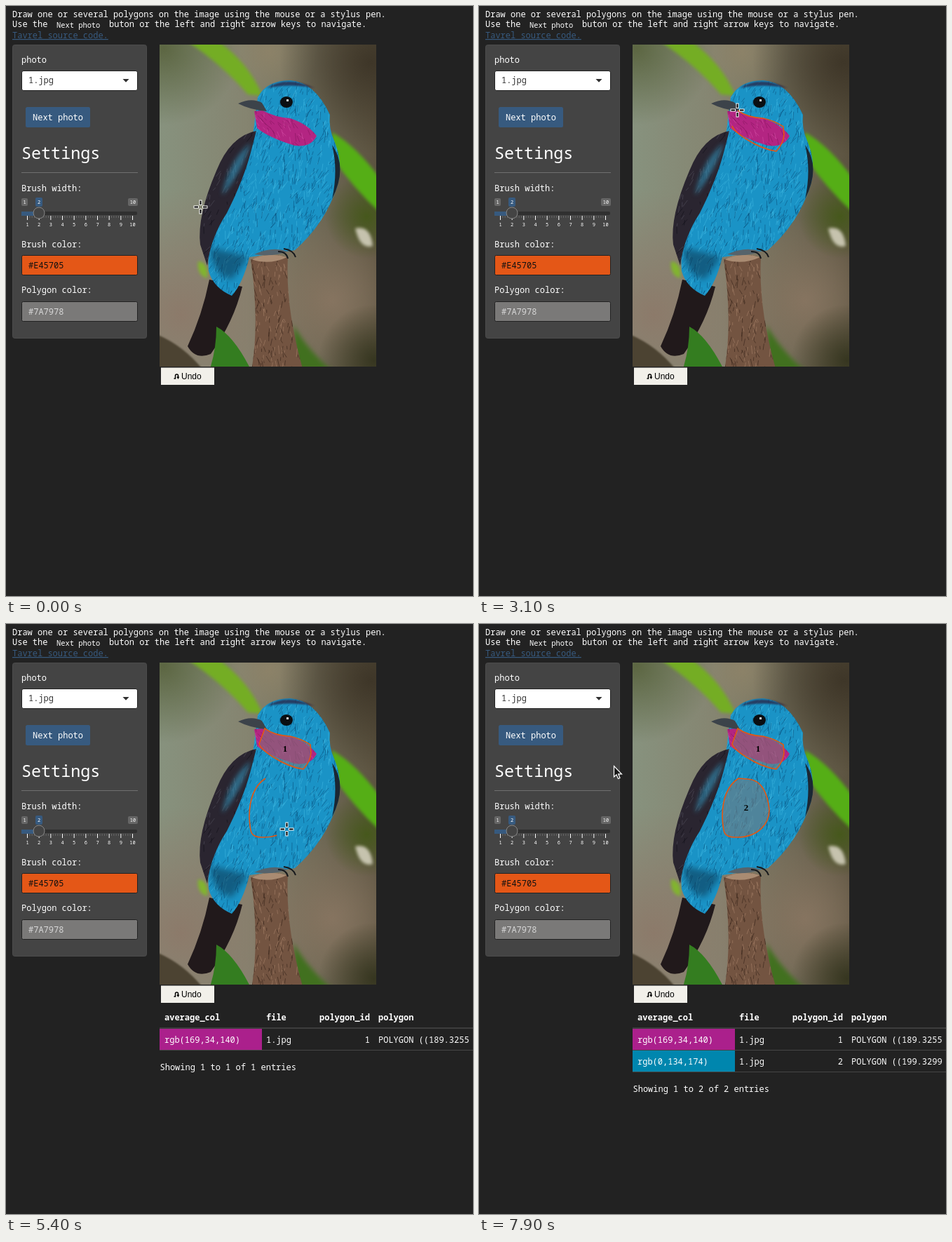
Recreate the animation shown at these times as an HTML page with a canvas. Size 666 by 841 pixels, loop 8 s.

```html
<!DOCTYPE html>
<html lang="en">
<head>
<meta charset="utf-8">
<title>Polygon drawing</title>
<style>
html, body { margin: 0; width: 100%; height: 100%; overflow: hidden; background: #222; }
svg, canvas { position: absolute; left: 0; top: 0; width: 666px; height: 841px; }
text { font: 12px "Noto Sans Mono", "DejaVu Sans Mono", monospace; fill: #fff; white-space: pre; }
.code { font-size: 10.4px; }
.link { fill: #375a7f; text-decoration: underline; }
.title { font-size: 23.4px; }
.tiny { font-size: 7px; text-anchor: middle; }
.head { font-weight: bold; }
.end { text-anchor: end; }
.undo { font: 12px "Liberation Sans", Arial, sans-serif; fill: #000; }
.rule { stroke: #464646; }
</style>
</head>
<body>
<svg viewBox="0 0 666 841">
  <text x="9" y="16">Draw one or several polygons on the image using the mouse or a stylus pen.</text>
  <text x="9" y="30">Use the</text>
  <text class="code" x="72" y="31">Next photo</text>
  <text x="147" y="30">buton or the left and right arrow keys to navigate.</text>
  <text class="link" x="9" y="46">Tavrel source code.</text>

  <rect x="9.5" y="55.5" width="191" height="418" rx="3" fill="#444" stroke="#4c4c4c"/>
  <text x="22" y="81">photo</text>
  <rect x="22.5" y="92.5" width="165" height="28" rx="2.5" fill="#fff" stroke="#222"/>
  <text x="32" y="110" style="fill:#333">1.jpg</text>
  <path d="M166.5 104h9l-4.5 4.8z" fill="#303030"/>
  <rect x="28" y="144" width="92" height="29" rx="2.5" fill="#375a7f"/>
  <text x="38" y="163">Next photo</text>
  <text class="title" x="22" y="218">Settings</text>
  <path d="M22 237.5H188" stroke="#707070"/>
  <text x="22" y="264">Brush width:</text>
  <g id="slider">
    <rect x="22" y="274" width="9" height="11" rx="2" fill="#666"/>
    <rect x="42" y="273" width="10" height="13" rx="2" fill="#375a7f"/>
    <rect x="174" y="274" width="14" height="11" rx="2" fill="#666"/>
    <text class="tiny" x="26.5" y="282">1</text>
    <text class="tiny" x="47" y="282">2</text>
    <text class="tiny" x="181" y="282">10</text>
    <rect x="22" y="293" width="165" height="5" rx="2" fill="#303030"/>
    <rect x="22" y="293" width="25" height="6" fill="#375a7f"/>
  </g>
  <text x="22" y="344">Brush color:</text>
  <rect x="22.5" y="355.5" width="165" height="28" rx="2" fill="#e45717" stroke="#222"/>
  <text x="32" y="374" style="fill:#111">#E45705</text>
  <text x="22" y="409">Polygon color:</text>
  <rect x="22.5" y="421.5" width="165" height="28" rx="2" fill="#7a7978" stroke="#222"/>
  <text x="32" y="440" style="fill:#d8d8d8">#7A7978</text>

  <rect x="221" y="515.5" width="76" height="24.5" fill="#f2f0ea"/>
  <path d="M239.5 531h2v-4q0-2 2-2t2 2v2M244 528.5l1.5 2 1-2" fill="none" stroke="#000" stroke-width="1.5"/>
  <text class="undo" x="250" y="532">Undo</text>

  <g id="table">
    <text class="head" x="226" y="565">average_col</text>
    <text class="head" x="371" y="565">file</text>
    <text class="head end" x="519" y="565">polygon_id</text>
    <text class="head" x="531" y="565">polygon</text>
    <path class="rule" d="M219 576H666" stroke-width="1.5"/>
    <rect x="219" y="577" width="146" height="30" fill="rgb(171,32,140)"/>
    <text x="226" y="597">rgb(169,34,140)</text>
    <text x="371" y="597">1.jpg</text>
    <text class="end" x="519" y="597">1</text>
    <text x="531" y="597">POLYGON ((189.3255</text>
    <path class="rule" d="M219 607.5H666"/>
    <text id="info" x="219.5" y="636"></text>
  </g>
  <g id="row2">
    <rect x="219" y="608" width="146" height="30" fill="rgb(0,134,174)"/>
    <text x="226" y="628">rgb(0,134,174)</text>
    <text x="371" y="628">1.jpg</text>
    <text class="end" x="519" y="628">2</text>
    <text x="531" y="628">POLYGON ((199.3299</text>
    <path class="rule" d="M219 638.5H666"/>
  </g>
</svg>
<canvas id="stage" width="666" height="841"></canvas>
<script>
const LOOP = 8000, STEP = 100;
const $ = id => document.getElementById(id);
const ctx = $('stage').getContext('2d');
const clamp = k => Math.max(0, Math.min(1, k));

function svgNode(name, attrs, text = '') {
  const node = document.createElementNS('http://www.w3.org/2000/svg', name);
  for (const key in attrs) node.setAttribute(key, attrs[key]);
  node.textContent = text;
  return node;
}

function addTicks() {
  const add = (...args) => $('slider').append(svgNode(...args));
  for (let i = 0; i <= 45; i++) {
    const x = 30.5 + i * 150 / 45, big = i % 5 === 0;
    add('path', { d: `M${x} 299v${big ? 6 : 3}`, stroke: big ? '#fff' : '#777', 'stroke-width': big ? 1 : 0.7 });
    if (big) add('text', { x, y: 314, class: 'tiny' }, 1 + i / 5);
  }
  add('circle', { cx: 47, cy: 295, r: 8, fill: '#444', stroke: '#888' });
}

function seeded(seed) {
  return () => (seed = (seed * 16807) % 2147483647) / 2147483647;
}

function paintPhoto() {
  const layer = document.createElement('canvas');
  layer.width = 666;
  layer.height = 841;
  const g = layer.getContext('2d');
  const rnd = seeded(71);

  const shape = (color, d, blur = 0) => {
    const path = new Path2D(d);
    g.filter = blur ? `blur(${blur}px)` : 'none';
    g.fillStyle = color;
    g.fill(path);
    g.filter = 'none';
    return path;
  };
  const glow = (x, y, r, rgb) => {
    const grad = g.createRadialGradient(x, y, 0, x, y, r);
    grad.addColorStop(0, `rgb(${rgb})`);
    grad.addColorStop(1, `rgba(${rgb},0)`);
    g.fillStyle = grad;
    g.fillRect(219, 55, 309, 459);
  };
  // Soft short strokes inside a shape: feathers and bark
  const grain = (path, count, tilt, dark, light) => {
    g.save();
    g.clip(path);
    for (let i = 0; i < count; i++) {
      const x = 255 + rnd() * 225, y = 105 + rnd() * 410;
      const angle = tilt + rnd() - 0.5, len = 4 + rnd() * 9;
      g.strokeStyle = rnd() < 0.5 ? dark : light;
      g.beginPath();
      g.moveTo(x, y);
      g.lineTo(x + Math.cos(angle) * len, y + Math.sin(angle) * len);
      g.stroke();
    }
    g.restore();
  };

  g.beginPath();
  g.rect(219, 55, 309, 459);
  g.clip();

  const back = g.createLinearGradient(219, 0, 528, 0);
  back.addColorStop(0, '#87927e');
  back.addColorStop(0.4, '#858470');
  back.addColorStop(1, '#5c5340');
  g.fillStyle = back;
  g.fillRect(219, 55, 309, 459);
  glow(225, 60, 110, '92,102,66');
  glow(375, 65, 70, '140,130,104');
  glow(520, 80, 130, '62,54,40');
  glow(250, 440, 180, '140,122,106');
  glow(465, 420, 120, '134,116,96');
  glow(515, 300, 60, '70,88,28');
  glow(525, 505, 80, '54,54,32');

  shape('#74ad24', 'M258 50H302Q345 80 366 128L345 126Q310 85 258 50Z', 2);
  shape('#55ae16', 'M465 180Q500 200 535 248V296Q495 260 465 215Z', 2);
  shape('#c6c3ae', 'M498 317Q520 312 523 342Q505 348 498 317Z', 2);
  shape('#81b32f', 'M274 364Q290 366 287 388Q272 384 274 364Z', 2);
  shape('#41701f', 'M410 455Q430 490 465 520H412Z', 3);
  shape('#4c4332', 'M215 468Q255 485 282 520H215Z', 1);

  shape('#21191b', 'M290 390Q280 440 259 485Q270 505 292 496Q325 450 337 400Z');
  const stump = shape('#735441', 'M349 361Q375 350 402 358Q398 430 424 520H350Q362 450 349 361Z');
  grain(stump, 1500, 1.5, 'rgba(40,24,16,.5)', 'rgba(190,150,122,.4)');
  shape('#a98b72', 'M350 361Q375 350 401 358Q375 370 350 361Z');

  const body = shape('#1a93c6',
    'M359 130Q372 106 405 106Q440 108 462 155Q460 175 468 192Q482 225 472 258Q455 310 412 348' +
    'L347 358Q338 395 322 413Q296 402 289 378Q286 340 300 300Q320 250 352 185Z');
  grain(body, 2200, 1.9, 'rgba(2,56,98,.42)', 'rgba(80,200,236,.38)');
  shape('rgba(10,30,50,.45)', 'M290 345Q320 350 346 358L322 390Q295 385 290 345Z', 5);
  const wing = shape('#2a2530', 'M357 178Q320 185 300 235Q272 300 277 340L287 370Q292 330 315 295Q340 245 350 205Z');
  grain(wing, 900, 1.9, 'rgba(10,10,18,.5)', 'rgba(110,110,125,.35)');
  shape('rgba(50,150,190,.6)', 'M349 195Q318 220 308 270Q335 240 349 195Z', 3);
  shape('#1b2733', 'M465 198Q488 230 465 275Q474 235 465 198Z');
  shape('rgba(42,32,66,.75)', 'M372 117Q400 98 440 117Q405 110 372 117Z', 1);

  const throat = shape('#b32582', 'M354 150L366 149Q385 159 405 160Q430 168 443 185Q435 202 412 199Q375 188 358 174Z');
  grain(throat, 1500, 1.1, 'rgba(110,14,76,.4)', 'rgba(225,95,180,.4)');

  shape('#3c434a', 'M331 139Q350 130 365 138L372 150Q348 148 331 139Z');
  shape('#0a0e12', 'M391 137A9 8 0 1 1 409 137A9 8 0 1 1 391 137Z');
  shape('#dce5e7', 'M400 133h3v3h-3z');
  shape('#56636b', 'M354 354Q380 342 402 350Q380 358 354 354Z');
  g.strokeStyle = '#17191c';
  g.lineWidth = 2;
  g.stroke(new Path2D('M388 350Q400 350 402 360M396 346Q410 348 413 358'));
  shape('#347d20', 'M300 457Q325 470 350 520H290Q300 490 300 457Z');
  return layer;
}

const glide = (from, to, x, y) => ({
  from,
  at(t, [x0, y0]) {
    const k = (1 - Math.cos(Math.PI * clamp((t - from) / (to - from)))) / 2;
    return [x0 + (x - x0) * k, y0 + (y - y0) * k];
  }
});

// An outline drawn by hand; the line trails the pen by one step
function outline({ d, from, to, reach, power, done, fill, label, x, y }) {
  const route = svgNode('path', { d }), length = route.getTotalLength();
  const drawn = t => t >= done ? length : length * reach * (1 - (1 - clamp((t - from) / (to - from))) ** power);
  return {
    from,
    at(t) {
      const p = route.getPointAtLength(drawn(t));
      return [p.x, p.y];
    },
    draw(t) {
      const closed = t >= fill, path = new Path2D(closed ? d + 'Z' : d);
      const shown = t >= done ? length : drawn(t - STEP);
      if (!shown) return;
      ctx.strokeStyle = '#e45712';
      ctx.lineWidth = 1.6;
      ctx.setLineDash(closed ? [] : [shown, length * 2]);
      if (closed) {
        ctx.fillStyle = 'rgba(122,121,120,.55)';
        ctx.fill(path);
      }
      ctx.stroke(path);
      ctx.setLineDash([]);
      if (!closed) return;
      ctx.fillStyle = '#000';
      ctx.font = 'bold 13px "Liberation Serif", serif';
      ctx.textAlign = 'center';
      ctx.fillText(label, x, y);
    }
  };
}

const throatLine = outline({
  d: 'M361 171Q363 178 380 189Q403 204 424 207Q434 196 435 184L434 172Q420 163 405 160Q383 159 369 149',
  from: 1400, to: 2400, reach: 0.67, power: 1.75, done: 3100, fill: 3600, label: '1', x: 398, y: 182
});
const chestLine = outline({
  d: 'M370 220C352 232 347 255 347 275C348 298 349 304 365 304C398 305 414 285 414 265C412 243 404 222 383 221',
  from: 4600, to: 6000, reach: 1, power: 1.1, done: 6000, fill: 6500, label: '2', x: 381, y: 266
});
const legs = [
  glide(300, 900, 358, 169), throatLine,
  glide(3500, 3900, 372, 207), glide(4100, 4300, 368, 218), chestLine,
  glide(7600, 7900, 192, 202)
];

function drawCross(x, y) {
  ctx.save();
  ctx.translate(Math.round(x) - 0.5, Math.round(y) - 0.5);
  for (const [color, width, inner, outer] of [['#fff', 4, 2.5, 10], ['#000', 2, 3.5, 9]]) {
    ctx.strokeStyle = color;
    ctx.lineWidth = width;
    for (let i = 0; i < 4; i++) {
      ctx.rotate(Math.PI / 2);
      ctx.beginPath();
      ctx.moveTo(inner, 0);
      ctx.lineTo(outer, 0);
      ctx.stroke();
    }
  }
  ctx.restore();
}

function drawArrow(x, y) {
  const arrow = new Path2D('M.5 .5V16L4 12.8 6.500 18.500 9 17.400 6.700 11.800H11.500Z');
  ctx.save();
  ctx.translate(x, y);
  ctx.fillStyle = '#181818';
  ctx.strokeStyle = '#fff';
  ctx.lineWidth = 1.2;
  ctx.fill(arrow);
  ctx.stroke(arrow);
  ctx.restore();
}

const photo = paintPhoto();
addTicks();

function frame() {
  const t = Math.floor(performance.now() % LOOP / STEP) * STEP;
  const rows = t >= 6700 ? 2 : t >= 3800 ? 1 : 0;
  $('table').style.display = rows ? '' : 'none';
  $('row2').style.display = rows > 1 ? '' : 'none';
  $('info').textContent = `Showing 1 to ${rows} of ${rows} entries`;
  $('info').setAttribute('y', 605 + 31 * rows);

  ctx.clearRect(0, 0, 666, 841);
  ctx.drawImage(photo, 0, 0);
  throatLine.draw(t);
  chestLine.draw(t);
  const [x, y] = legs.reduce((pos, leg) => t >= leg.from ? leg.at(t, pos) : pos, [278, 287]);
  (x < 219 ? drawArrow : drawCross)(x, y);
  requestAnimationFrame(frame);
}
frame();
</script>
</body>
</html>
```
